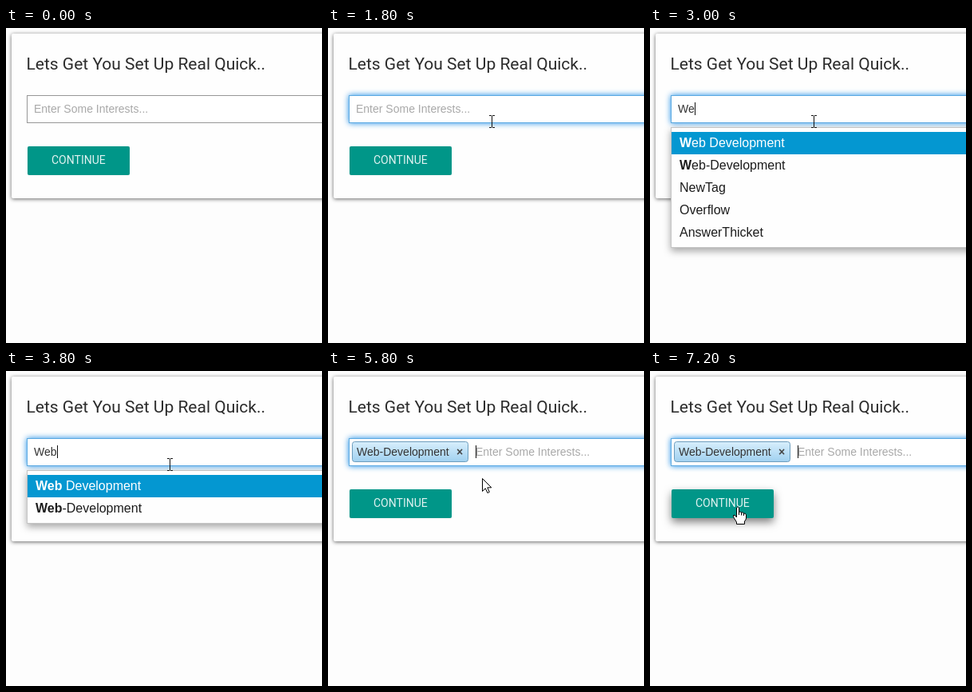
These frames come from a looping animation (396 by 394 pixels, 7400 ms). An HTML page with a canvas:

```html
<!DOCTYPE html>
<html lang="en">
<head>
<meta charset="utf-8">
<title>Interest picker</title>
<style>
  html, body { margin: 0; width: 100%; height: 100%; overflow: hidden; background: #fdfdfd; }
  canvas { display: block; }
</style>
</head>
<body>
<canvas id="stage" width="396" height="394"></canvas>
<script>
const ctx = document.getElementById('stage').getContext('2d');
const LOOP = 7400, STEP = 200;
const SANS = '"Liberation Sans", Arial, sans-serif';
const ROBOTO = 'Roboto, sans-serif';
const OPTIONS = ['Web Development', 'Web-Development', 'NewTag', 'Overflow', 'AnswerThicket'];

// Pointer hot spot: [step, x, y]; each place holds until the next one.
const PATH = [
  [1, 345, 376], [2, 300, 262], [3, 248, 150], [4, 196, 72], [5, 160, 50], [6, 192, 106],
  [7, 205, 117], [25, 204, 122], [26, 203, 128], [27, 196, 160], [28, 193, 168],
  [29, 193, 134], [30, 205, 146], [31, 230, 168], [32, 243, 184], [33, 212, 188],
  [34, 150, 187], [35, 84, 178], [36, 110, 170]
];

const ARROW = new Path2D('M.5 .5V16.5L4.3 12.8L6.9 18.5L9.3 17.4L6.8 11.8H11.8Z');
const HAND = new Path2D('M-1.5 1Q0 -1.5 1.5 1V6.5Q3 5 4.5 7Q6 6 7.5 8Q10 7.5 10.5 10V14' +
  'Q10.5 16 8.5 18V21.5H-1.5V19L-5.5 12.5Q-6.5 9.5 -3.5 10.5L-1.5 13Z');
const HAND_LINES = new Path2D('M1.5 6V10M4.5 7V10.5M7.5 8V11');

function text(str, x, y, font, color) {
  ctx.font = font;
  ctx.fillStyle = color;
  ctx.fillText(str, x, y);
  return x + ctx.measureText(str).width;
}

function rect(x, y, w, h, fill) {
  ctx.fillStyle = fill;
  ctx.fillRect(x, y, w, h);
}

function shadowed(dy, blur, color, draw) {
  ctx.save();
  ctx.shadowOffsetY = dy;
  ctx.shadowBlur = blur;
  ctx.shadowColor = color;
  draw();
  ctx.restore();
}

function rounded(x, y, w, h, r, fill) {
  ctx.beginPath();
  ctx.roundRect(x, y, w, h, r);
  ctx.fillStyle = fill;
  ctx.fill();
}

function drawCard() {
  rect(0, 0, 396, 394, '#fdfdfd');
  shadowed(1, 5, 'rgba(0,0,0,.6)', () => rounded(7, 7, 420, 206, 2, '#fefefe'));
  text('Lets Get You Set Up Real Quick..', 25.5, 52, '21px ' + ROBOTO, '#2b2b2b');
}

function drawButton(raised) {
  const body = () => rounded(27, 148, 128, 36, 2, '#009688');
  if (raised) shadowed(5, 11, 'rgba(0,0,0,.5)', body);
  else shadowed(0, 1, 'rgba(0,0,0,.2)', body);
  text('CONTINUE', 57, 170, '14px ' + ROBOTO, 'rgba(255,255,255,.88)');
}

function drawTag() {
  const fill = ctx.createLinearGradient(0, 88, 0, 114);
  fill.addColorStop(0, '#d9effc');
  fill.addColorStop(1, '#9fd0f0');
  rounded(30.5, 88.5, 145, 25, 3, fill);
  ctx.strokeStyle = '#6d9dbd';
  ctx.stroke();
  text('Web-Development', 36, 106, '14px ' + SANS, '#333');
  text('×', 161, 106, 'bold 14px ' + SANS, '#444');
}

function drawInput(glow, typed, tagged, caret) {
  const box = color => {
    rect(26, 84, 400, 35, color);
    rect(27, 85, 400, 33, '#fff');
  };
  if (glow) shadowed(0, 7, `rgba(82,168,236,${glow})`, () => box('#5fa9dc'));
  else box('#979797');
  if (tagged) drawTag();
  const x = tagged ? 185 : 35;
  let end = x;
  if (typed) end = text(typed, x, 106, '14px ' + SANS, '#333') + .5;
  else text('Enter Some Interests...', x, 106, '14px ' + SANS, '#a9a9a9');
  if (caret) rect(Math.round(end), 93, 1, 16, '#111');
}

function drawList(query, active) {
  const rows = query.length > 1 ? 2 : 5;
  const bottom = 135 + rows * 28;
  shadowed(4, 9, 'rgba(0,0,0,.35)', () => rect(26, 124, 400, bottom - 124, '#c4c4c4'));
  rect(27, 125, 400, bottom - 126, '#fefefe');
  rect(27, 130 + active * 28, 400, 28, '#0497d1');
  OPTIONS.slice(0, rows).forEach((name, i) => {
    const color = i === active ? '#fff' : '#1c1c1c';
    const y = 149 + i * 28;
    const lead = name.startsWith(query) ? query : '';
    const x = text(lead, 37, y, 'bold 16px ' + SANS, color);
    text(name.slice(lead.length), x, y, '16px ' + SANS, color);
  });
}

function drawPointer(x, y, listOpen) {
  const onButton = !listOpen && x > 27 && x < 155 && y > 148 && y < 184;
  const onOption = listOpen && y >= 130;
  const onText = (y > 36 && y < 58) || (y > 84 && y < 130);
  ctx.save();
  ctx.translate(x, y);
  ctx.lineWidth = 1;
  ctx.strokeStyle = '#000';
  if (onButton || onOption) {
    ctx.fillStyle = '#fff';
    ctx.fill(HAND);
    ctx.stroke(HAND);
    ctx.stroke(HAND_LINES);
  } else if (onText) {
    rect(0, -7, 1, 14, '#111');
    for (const dy of [-8, 7]) {
      rect(-3, dy, 3, 1, '#111');
      rect(1, dy, 3, 1, '#111');
    }
  } else {
    ctx.fillStyle = '#fff';
    ctx.fill(ARROW);
    ctx.stroke(ARROW);
  }
  ctx.restore();
}

function draw(n) {
  const within = (a, b) => n >= a && n < b;
  const tagged = n >= 29;
  const listOpen = within(15, 29);
  const typed = within(14, 29) ? 'Web'.slice(0, n < 15 ? 1 : n < 18 ? 2 : 3) : '';
  const query = 'Web'.slice(0, n < 16 ? 1 : n < 19 ? 2 : 3);
  const caret = n >= 8 && !within(9, 11) && !within(22, 24) && !within(32, 34);

  drawCard();
  drawInput(n < 8 ? 0 : n < 9 ? .5 : .9, typed, tagged, caret);
  drawButton(n === 36);
  if (listOpen) drawList(query, n >= 27 ? 1 : 0);
  const place = PATH.filter(p => p[0] <= n).pop();
  if (place) drawPointer(place[1], place[2], listOpen);
}

const start = performance.now();
function tick() {
  draw(Math.floor((performance.now() - start) % LOOP / STEP));
  requestAnimationFrame(tick);
}
tick();
</script>
</body>
</html>
```
